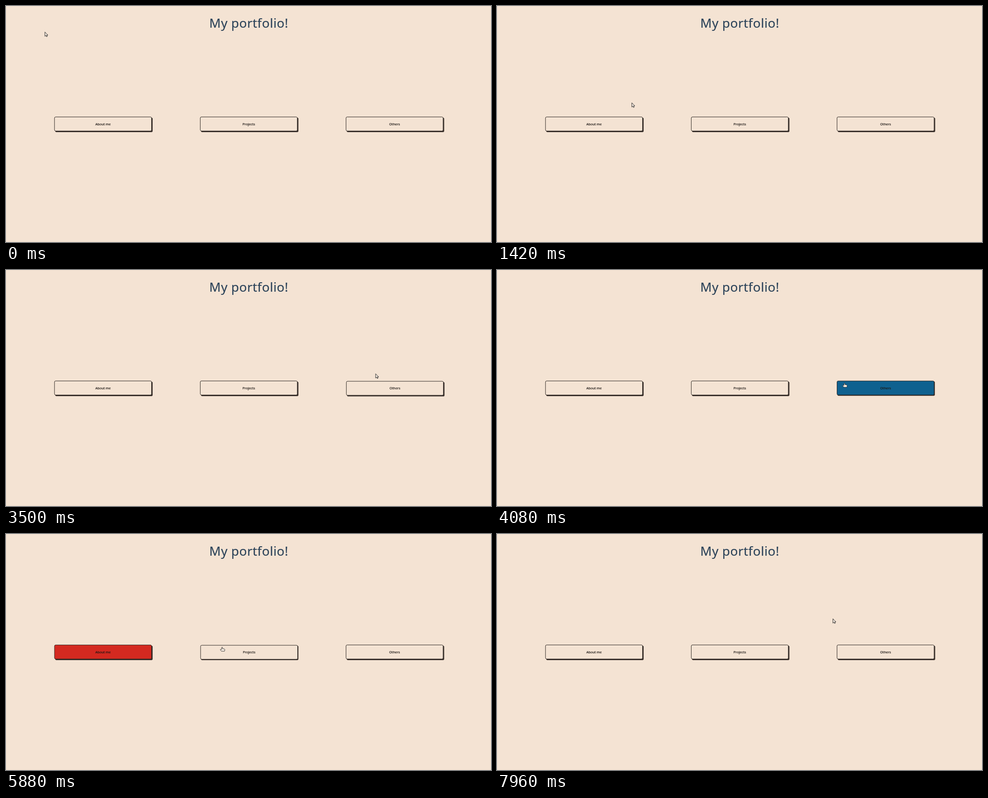
These frames come from a looping animation (1072x522 px, 8 s). An HTML page:

```html
<!DOCTYPE html>
<html lang="en">
<head>
<meta charset="utf-8">
<title>My portfolio!</title>
<style>
  html, body { margin: 0; width: 100%; height: 100%; overflow: hidden; background: #f4e3d3; }
  svg { display: block; width: 1072px; height: 522px; font-family: "Noto Sans", sans-serif; text-anchor: middle; }
  .title { font-size: 28px; letter-spacing: .5px; fill: #2d445a; stroke: #2d445a; stroke-width: .2; }
  .label { font-size: 7.4px; fill: #1d1815; stroke: #1d1815; stroke-width: .2; }
  .shadow { fill: #3a302b; }
  .face { stroke: #29231f; }
  .cursor { fill: #f6ece2; stroke: #262626; stroke-linejoin: round; }
</style>
</head>
<body>
<svg viewBox="0 0 1072 522">
  <text class="title" x="536.7" y="48">My portfolio!</text>
  <g id="buttons"></g>
  <g id="cursor" class="cursor">
    <path id="arrow" d="M.5 .5V10.1L2.8 8 4.2 11 5.8 10.2 4.4 7.4H7.1Z"/>
    <path id="hand" stroke-width=".9" d="M-1 5.2V.8Q0-.4 1 .8V3.6L5 4.3Q6.2 4.7 6 6.2L5.3 9.2H-1.4L-4 6.2Q-4.2 4.8-2.8 5Z"/>
  </g>
</svg>
<script>
const LOOP = 8000;
const LEFT = 107.2, TOP = 245.4, PITCH = 322.2, WIDTH = 214.5, HEIGHT = 31;
// The page reacts slightly before the drawn pointer; colour follows late and lingers.
const LEAD = 40, COLOR_IN = 120, COLOR_OUT = 480;

// Turning points of the pointer: [time, x, y]
const stops = [
  [0, 85.5, 57], [100, 100, 37], [800, 838, 247], [1420, 297.5, 213.5],
  [1560, 290, 251], [1710, 321, 229], [2080, 484, 247], [2420, 484, 247],
  [2720, 640, 189], [2920, 810, 252], [3220, 564, 209], [3500, 816.5, 229],
  [3560, 835, 256], [3900, 840, 250], [4500, 510, 250], [4830, 494, 171],
  [5200, 270, 250], [5450, 230, 250], [5680, 330, 147], [5850, 480, 250],
  [6360, 260, 252], [6500, 480, 148], [6750, 834, 258], [7250, 810, 252],
  [7600, 204, 205], [7960, 742, 187]
];

const byId = id => document.getElementById(id);
const add = (parent, name, attrs) => {
  const node = document.createElementNS("http://www.w3.org/2000/svg", name);
  for (const key in attrs) node.setAttribute(key, attrs[key]);
  return parent.appendChild(node);
};
const move = (node, x, y) => node.setAttribute("transform", `translate(${x} ${y})`);
const show = (node, visible) => node.setAttribute("visibility", visible ? "visible" : "hidden");

const buttons = [["About me", "#d42920"], ["Projects", "#f9c22b"], ["Others", "#0f618f"]].map(([label, color], i) => {
  const x = LEFT + i * PITCH;
  const group = add(byId("buttons"), "g", {});
  const shadow = add(group, "rect", { class: "shadow", x: x - .5, y: TOP - .5, width: WIDTH + .8, height: HEIGHT + .9, rx: 2.6 });
  const face = add(group, "rect", { class: "face", x, y: TOP, width: WIDTH, height: HEIGHT, rx: 2.6 });
  add(group, "text", { class: "label", x: x + WIDTH / 2, y: 263.7 }).textContent = label;
  return { x, color, group, shadow, face };
});

function pointerAt(t) {
  const next = stops.findIndex(([time]) => time > t);
  const [, ...to] = stops.at(next);
  if (next < 1) return next ? to : stops[0].slice(1);
  const [begin, ...from] = stops[next - 1];
  const u = (t - begin) / (stops[next][0] - begin), eased = u * u * (3 - 2 * u);
  return from.map((value, axis) => value + (to[axis] - value) * eased);
}

function isOver(button, t) {
  if (t < 0) return false;
  const [x, y] = pointerAt(t);
  return x > button.x && x < button.x + WIDTH && y > TOP && y < TOP + HEIGHT;
}

function isColored(button, t) {
  for (let lag = COLOR_IN; lag <= COLOR_OUT; lag += 10) {
    if (isOver(button, t - lag)) return true;
  }
  return false;
}

function draw(t) {
  for (const button of buttons) {
    const shift = isOver(button, t + LEAD) ? .7 : 0;
    const drop = isOver(button, t) ? 1.4 : 2.1;
    move(button.group, shift, shift);
    move(button.shadow, drop, drop);
    button.face.setAttribute("fill", isColored(button, t) ? button.color : "#f4e3d3");
  }
  const pointing = buttons.some(button => isOver(button, t));
  move(byId("cursor"), ...pointerAt(t));
  show(byId("hand"), pointing);
  show(byId("arrow"), !pointing);
}

const start = performance.now();
function tick() {
  draw((performance.now() - start) % LOOP);
  requestAnimationFrame(tick);
}
tick();
</script>
</body>
</html>
```
